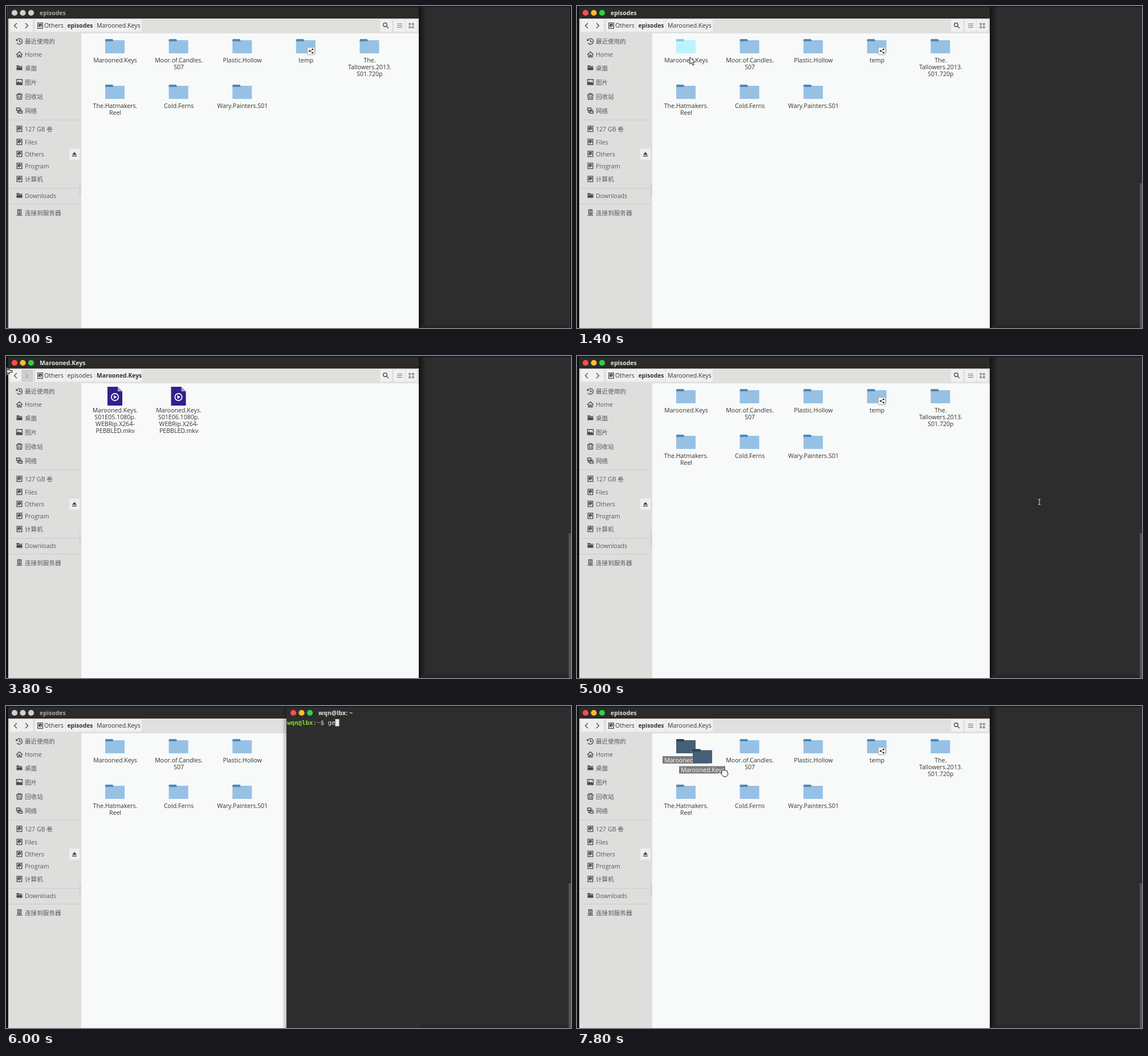
These frames come from a looping animation (991 px wide and 565 px high, 8 s). An HTML page:

```html
<!DOCTYPE html>
<html lang="zh">
<head>
<meta charset="utf-8">
<title>File manager and terminal</title>
<style>
  html, body { margin: 0; width: 100%; height: 100%; overflow: hidden; background: #2d2d2d; }
  svg { display: block; width: 100%; height: 100%; }
  text { font: 10.6px "Open Sans", "Noto Sans CJK SC", "Noto Sans CJK", sans-serif; fill: #333; white-space: pre; }
  .bold { font-weight: 700; font-size: 10.3px; }
  .middle { text-anchor: middle; }
  .side text { fill: #5a5a5a; }
  .icon { fill: none; stroke: #484848; stroke-width: 1.3; }
  .solid { fill: #484848; stroke: none; }
  .title { fill: #e2e2de; }
  .red { fill: #fc4f49; } .yellow { fill: #fdbc2f; } .green { fill: #2fd146; }
  .inactive .dot { fill: #d0d0d0; }
  .inactive .title { fill: #a9a9a5; }
  .body { fill: #96c1e5; } .tab { fill: #4b89b8; }
  .lit .body { fill: #bdf3fe; } .lit .tab { fill: #82cfe5; }
  .selected .body { fill: #465f76; } .selected .tab { fill: #2b4056; }
  .tag { fill: #7c7c7c; display: none; }
  .selected .tag { display: inline; }
  .selected text { fill: #fff; }
  .term text { font: 10.8px "DejaVu Sans Mono", monospace; fill: #e4e4e0; }
  .term .title { font: 700 10.3px "Open Sans", sans-serif; }
  .pointer path { fill: #fff; stroke: #151515; stroke-width: 1; stroke-linejoin: round; }
</style>
</head>
<body>
<svg id="stage" viewBox="0 0 991 565" preserveAspectRatio="none"></svg>
<script>
const SHOW = 'Marooned.Keys';
const HOST = 'wqn@lbx';
const COMMAND = 'getsub ';
const CELL = 6.5;

const rect = (x, y, w, h, fill, extra = '') =>
  `<rect x="${x}" y="${y}" width="${w}" height="${h}" fill="${fill}" ${extra}/>`;
const text = (x, y, str, cls = '', extra = '') =>
  `<text x="${x}" y="${y + 3.7}" class="${cls}" ${extra}>${str}</text>`;
const at = (x, y, content, extra = '') =>
  `<g transform="translate(${x} ${y})" ${extra}>${content}</g>`;
const icon = (d, cls = '') => `<path class="icon ${cls}" d="${d}"/>`;
const lines = (x, y, rows) =>
  rows.map((row, i) => text(x, y + i * 12.2, row, 'middle')).join('');
const dots = x => ['red', 'yellow', 'green'].map((color, i) =>
  `<circle class="dot ${color}" cx="${x + i * 14.5}" cy="12" r="5.1"/>`).join('');

// Small symbols, each drawn around its own centre
const glyph = {
  clock: icon('M-4.5-2A5 5 0 1 1-4 3M-5.5-4V-1.5H-3M0-3V.5H3'),
  home: icon('M-5.5 .5L0-4.5L5.5 .5M-3.5 0V4.5H-1V1H1V4.5H3.5V0'),
  folder: icon('M-5-4.2H-1L0-3H5V-1.8H-5ZM-5-1H5V4H-5Z', 'solid'),
  picture: icon('M-5-4.5H5V4.5H-5Z') + icon('M-4.5 4V1L-2-1.5L0 1L2-.5L4.5 2V4Z', 'solid'),
  bin: icon('M-5.5-2.8H5.5M-2.5-3V-4.8H2.5V-3M-4.5-2.5L-3.8 5H3.8L4.5-2.5M-1.6-1V3.5M1.6-1V3.5'),
  network: icon('M-5-4.5H1V-.5H-5ZM-1 1H5V4.5H-1ZM-3.5 0V3H-1.5M3-3V0'),
  disk: icon('M-4.3-4.8H4.3V4.8H-4.3Z') +
    '<circle class="solid" r="3" cy="-.4"/><path d="M0-.4L3.2 3.5" stroke="#e0e0e0" stroke-width="1.2"/>',
  server: icon('M-3-5H3V2H-3ZM-5 4.7H5M0 2V4.5M-1.5-2.8H1.5M-1.5-.5H1.5'),
};

const sidebarItems = [
  ['clock', 62.5, '最近使用的'], ['home', 85.5, 'Home'], ['folder', 109, '桌面'],
  ['picture', 134, '图片'], ['bin', 159, '回收站'], ['network', 184, '网络'],
  ['disk', 216, '127 GB 卷'], ['disk', 239, 'Files'], ['disk', 260, 'Others'],
  ['disk', 281, 'Program'], ['disk', 304, '计算机'], ['folder', 333, 'Downloads'],
  ['server', 363, '连接到服务器'],
];

const folders = [
  [SHOW], ['Moor.of.Candles.', 'S07'], ['Plastic.Hollow'], ['temp'],
  ['The.', 'Tallowers.2013.', 'S01.720p'],
  ['The.Hatmakers.', 'Reel'], ['Cold.Ferns'], ['Wary.Painters.S01'],
];

const folderArt = `<path class="body" d="M-17 2H17V25H-17Z"/>
  <path class="tab" d="M-16 0H-4L-3 2V4H-17V1Z"/>`;
const shareBadge = rect(2.5, 14.5, 13, 13, '#f4f4f4', 'rx="1.5" stroke="#a5a5a5"') +
  `<path d="M12 18L6.5 21L12 24" fill="none" stroke="#555"/>
   <circle cx="12" cy="18" r="1.2"/><circle cx="6.5" cy="21" r="1.2"/><circle cx="12" cy="24" r="1.2"/>`;

function folder(rows, i) {
  const tag = i ? '' : '<rect class="tag" x="-41" y="30" width="81" height="13"/>';
  const badge = rows[0] === 'temp' ? shareBadge : '';
  return at(191 + (i % 5) * 111.6, i < 5 ? 58 : 138,
    folderArt + badge + tag + lines(.5, 37, rows), i ? '' : 'id="first"');
}

function video(episode, x) {
  const rows = [SHOW + '.', `S01E${episode}.1080p.`, 'WEBRip.X264-', 'PEBBLED.mkv'];
  return at(x, 54, `<path d="M-13 0H5L13 8V33H-13Z" fill="#30208b"/>
    <path d="M5 0L13 8H5Z" fill="#aaa0d5"/>
    <circle cy="18" r="6.2" fill="none" stroke="#fff" stroke-width="1.7"/>
    <path d="M-2 14.8L3.5 18L-2 21.2Z" fill="#fff"/>` + lines(.5, 41, rows));
}

function toolbar() {
  const button = (x, w) => rect(x, 24, w, 21, '#f0f0ef', 'rx="2"');
  const gridDots = [0, 1, 2, 3].map(i =>
    `<rect x="${707 + (i % 2) * 5.5}" y="${30.5 + (i >> 1) * 5.5}" width="2.5" height="2.5" fill="none" stroke="#666"/>`).join('');
  return rect(4, 22, 720, 26, '#e0e0df') +
    [[7, 20], [27, 20], [51, 53], [105, 50], [156, 82], [656, 21], [680, 20], [701, 20]]
      .map(b => button(...b)).join('') +
    '<rect id="forwardOff" x="27" y="24" width="20" height="21" rx="2" fill="#cfcfce"/>' +
    at(17, 34.5, icon('M2-4.5L-2.5 0L2 4.5')) +
    at(36, 34.5, icon('M-2-4.5L2.5 0L-2 4.5'), 'id="forward"') +
    at(60, 34.5, glyph.disk) + text(67, 34.5, 'Others') +
    `<text id="crumbParent" x="107.5" y="38.2">episodes</text>
     <text id="crumbChild" x="159" y="38.2">${SHOW}</text>` +
    at(666, 34, '<circle class="icon" cx="-1" cy="-1" r="3.3" stroke-width="1.7"/>' + icon('M1.5 1.5L5 5')) +
    '<path d="M686 31.5H695M686 34.5H695M686 37.5H695" stroke="#777"/>' + gridDots;
}

function sidebar() {
  const rows = sidebarItems.map(([name, y, label]) =>
    at(23.5, y - .5, glyph[name]) + text(33, y, label)).join('');
  const rules = [199.5, 319.5, 347].map(y => rect(4, y, 126, 1, '#cbcbca')).join('');
  return `<g class="side">${rect(4, 47, 128, 518, '#dededd')}${rules}${rows}
    ${rect(111, 250, 18, 20, '#eeeeed', 'rx="2"')}
    <path d="M116 261L120 256L124 261ZM116 262.5H124V264H116Z" fill="#444"/>
    <path d="M129 311V334M131 313V334" stroke="#aaa" stroke-dasharray="1 2"/></g>`;
}

const fileWindow = `<g id="files">
  ${rect(724, 2, 13, 563, 'url(#shade)')}
  ${rect(4, 2, 720, 20, '#2c2b29')}${dots(15)}
  <text id="title" class="bold title" x="59" y="15.8" letter-spacing=".1"></text>
  ${rect(131, 47, 593, 518, '#f8f9f9')}${toolbar()}${sidebar()}
  <g id="episodeList">${folders.map(folder).join('')}</g>
  <g id="videoList">${video('05', 191)}${video('06', 302.5)}</g>
  <g id="ghost" class="selected">${at(191, 58, folderArt +
    '<rect class="tag" x="-41" y="30" width="81" height="13"/>' + text(.5, 37, SHOW, 'middle'))}</g>
</g>`;

const terminal = `<g id="terminal" class="term">
  ${rect(484, 2, 8, 563, 'url(#shadeLeft)')}
  ${rect(492, 2, 499, 563, '#2d2d2d')}${dots(504)}
  <text class="title" x="548" y="16" letter-spacing=".2">${HOST}: ~</text>
  <text x="493" y="33" font-weight="700" style="font-weight:700;fill:#84dc32">${HOST}</text>
  <text x="${493 + 7 * CELL}" y="33">:<tspan fill="#7398c8">~</tspan>$ <tspan id="typed"></tspan></text>
  <rect id="caret" y="23" width="7" height="12.5" fill="#e4e4e0"/>
</g>`;

const pointers = {
  arrow: '<path d="M0 0V12L3 9.3L5 14L7.2 13L5.2 8.6H9Z"/>',
  beam: '<path d="M-2-4.5H2M0-4.5V4.5M-2 4.5H2" style="stroke:#ddd;fill:none"/>',
  edge: '<path d="M1-7H3V-1.5L6-4.5V-1.5H11V1.5H6V4.5L3 1.5V7H1Z"/>',
  hand: '<path d="M1 3Q1-1 4 1Q6-1 8 1.5Q11 1 11 4L12 8L9 12H4L0 7Q-1 5 1 5Z"/>',
};

stage.innerHTML = `<defs>
  <linearGradient id="shade"><stop stop-color="#121212"/><stop offset="1" stop-color="#2d2d2d"/></linearGradient>
  <linearGradient id="shadeLeft"><stop stop-color="#000" stop-opacity="0"/><stop offset="1" stop-color="#000" stop-opacity=".25"/></linearGradient>
  </defs>
  ${rect(0, 0, 991, 565, '#2d2d2d')}
  ${fileWindow}${terminal}
  ${rect(0, 0, 991, 2, '#101c21')}${rect(0, 0, 3.5, 565, '#0d1216')}
  ${rect(728, 560, 263, 5, '#262626')}
  <g id="edgeLines">${rect(988, 2, 1, 563, '#494949')}${rect(989, 2, 2, 563, '#111')}${rect(2, 0, 1, 565, '#555')}</g>
  ${rect(987, 311, 4, 254, '#555', 'id="scrollbar"')}
  <g id="pointer" class="pointer">${Object.entries(pointers)
    .map(([name, art]) => `<g data-shape="${name}">${art}</g>`).join('')}</g>`;

// Pointer route: time, x, y, shape from that moment on
const route = [
  [0, 0, 0, ''], [400, 840, 200, 'beam'], [800, 610, 155, 'arrow'], [1000, 468, 128, 'arrow'],
  [1200, 342, 110, 'arrow'], [1400, 198, 90, 'arrow'], [2400, 217, 103, 'arrow'],
  [2600, 210, 94, 'arrow'], [3000, 205, 92, 'arrow'], [3400, 95, 56, 'arrow'],
  [3800, 0, 27, 'edge'], [4000, 15, 34, 'arrow'], [4200, 16, 35, 'arrow'],
  [4600, 697, 222, 'arrow'], [4800, 784, 250, 'beam'], [5000, 811, 256, 'beam'],
  [5400, 811, 256, ''], [6600, 750, 195, 'beam'], [7000, 420, 130, 'arrow'],
  [7200, 285, 112, 'arrow'], [7400, 224, 95, 'arrow'], [7600, 236, 102, 'hand'],
  [7800, 253, 112, 'hand'], [8000, 253, 112, 'hand'],
];

function pointerAt(t) {
  const i = route.findIndex((p, n) => t >= p[0] && t < route[n + 1][0]);
  const [t0, x0, y0, shape] = route[i], [t1, x1, y1] = route[i + 1];
  const k = (t - t0) / (t1 - t0);
  return { x: x0 + (x1 - x0) * k, y: y0 + (y1 - y0) * k, shape };
}

const el = id => document.getElementById(id);
const show = (id, on) => { el(id).style.display = on ? '' : 'none'; };
const typedCount = t => t < 5800 ? 0 : t < 6000 ? 1 : Math.min(COMMAND.length, 2 + (t - 6000) / 100);

function draw(t) {
  const inTerminal = t >= 5200 && t < 7400;
  const inShow = t >= 3000 && t < 4200;
  const active = t >= 200 && !inTerminal;
  const { x, y, shape } = pointerAt(t);

  el('files').classList.toggle('inactive', !active);
  show('terminal', inTerminal);
  show('edgeLines', t < 200);
  show('scrollbar', t >= 200);

  show('episodeList', !inShow);
  show('videoList', inShow);
  show('forwardOff', inShow);
  el('forward').style.opacity = inShow ? .35 : 1;
  el('title').textContent = inShow ? SHOW : 'episodes';
  el('crumbParent').setAttribute('class', inShow ? '' : 'bold');
  el('crumbChild').setAttribute('class', inShow ? 'bold' : '');

  const selected = (t >= 2800 && t < 3000) || t >= 7400;
  const hovered = shape === 'arrow' && x > 150 && x < 231 && y > 55 && y < 101;
  el('first').setAttribute('class', selected ? 'selected' : hovered ? 'lit' : '');
  show('ghost', t >= 7600);
  el('ghost').setAttribute('transform', `translate(${x - 224} ${y - 94.5})`);

  const typed = COMMAND.slice(0, typedCount(t));
  el('typed').textContent = typed;
  el('caret').setAttribute('x', 493 + (11 + typed.length) * CELL);

  el('pointer').setAttribute('transform', `translate(${x} ${y})`);
  for (const g of el('pointer').children) g.style.display = g.dataset.shape === shape ? '' : 'none';
}

const start = performance.now();
function tick() {
  const t = (performance.now() - start) % 8000;
  draw(Math.floor(t / 200) * 200);
  requestAnimationFrame(tick);
}
tick();
</script>
</body>
</html>
```
